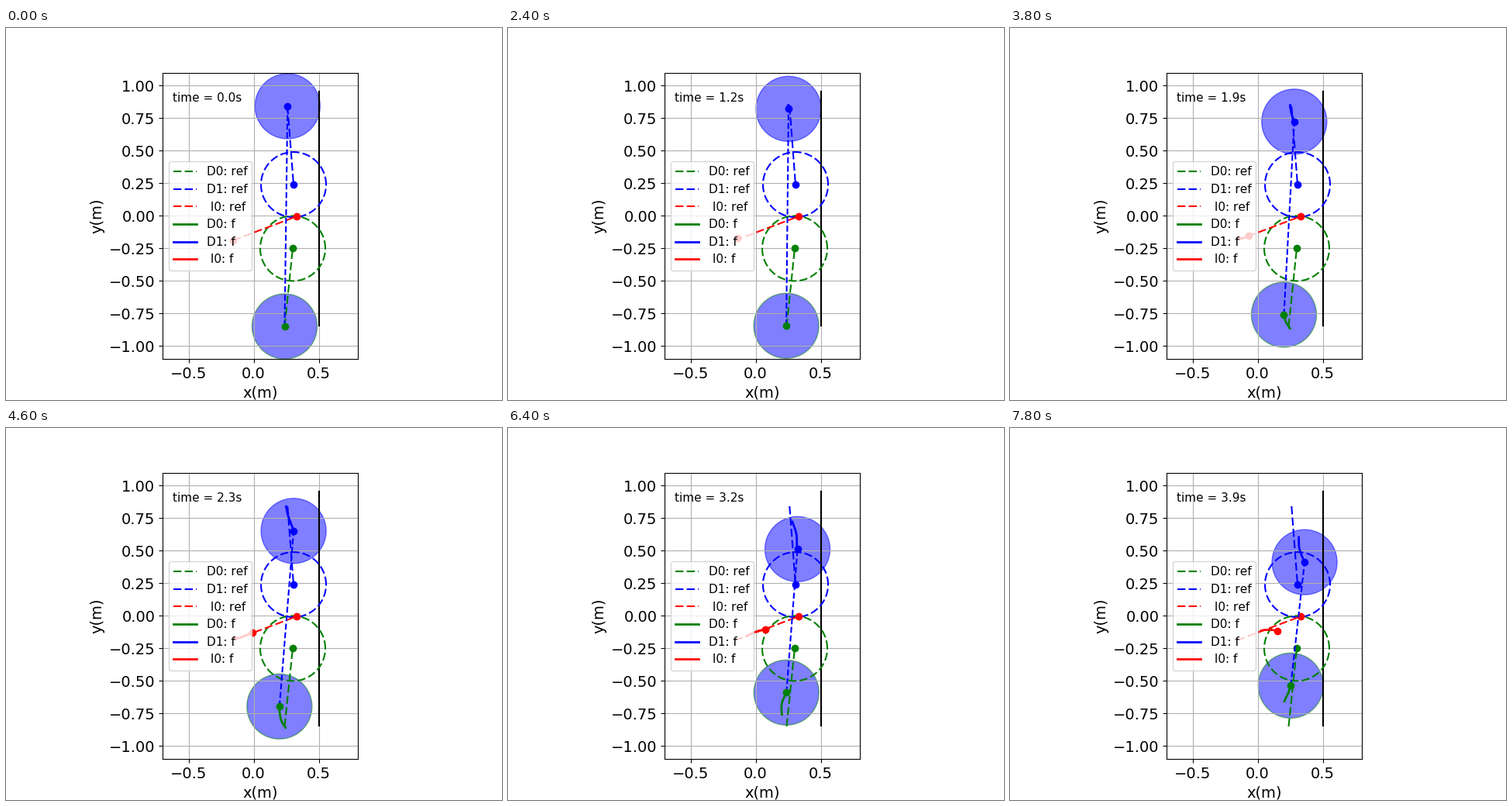
A matplotlib script that plays this animation: 640 by 480 pixels, repeating every 8000 ms.

```python
import numpy as np
import matplotlib.pyplot as plt
from matplotlib.animation import FuncAnimation
from matplotlib.patches import Circle

plt.rcParams["text.kerning_factor"] = 6

FRAMES, STEP_MS, DT = 40, 200, 0.1
TRAIL = 13  # steps kept in each solid trail
RADIUS = 0.25
DASH = (0, (5, 2))

# Each body passes its waypoints (metres) at these times (seconds)
STOPS = np.array([0, 1.0, 1.6, 2.4, 3.2, 4.0])
BODIES = [
    dict(name="D0", color="green", goal=(0.3, -0.25),
         way=[(0.2375, -0.849), (0.245, -0.859), (0.211, -0.801),
              (0.199, -0.682), (0.236, -0.589), (0.256, -0.528)]),
    dict(name="D1", color="blue", goal=(0.306, 0.24),
         way=[(0.26, 0.842), (0.249, 0.84), (0.264, 0.771),
              (0.311, 0.636), (0.321, 0.5125), (0.366, 0.398)]),
    dict(name=" I0", color="red", goal=(0.33, -0.004),
         way=[(-0.158, -0.188), (-0.153, -0.166), (-0.111, -0.17),
              (0.004, -0.121), (0.075, -0.107), (0.165, -0.115)]),
]


def glide(way, t):
    """Cubic Hermite curve through the waypoints."""
    p = np.array(way)
    m = np.gradient(p, STOPS, axis=0)
    i = np.searchsorted(STOPS, t, side="right") - 1
    h = (STOPS[i + 1] - STOPS[i])[:, None]
    u = (t - STOPS[i])[:, None] / h
    ease = u * u * (3 - 2 * u)
    bend = u * (1 - u) * ((1 - u) * m[i] - u * m[i + 1])
    return (p[i] + ease * (p[i + 1] - p[i]) + h * bend).T


times = np.arange(FRAMES) * DT
paths = [glide(b["way"], times) for b in BODIES]

fig, ax = plt.subplots(figsize=(6.4, 4.8), dpi=100)
ax.set_aspect("equal")
ax.set_xlim(-0.7, 0.8)
ax.set_ylim(-1.1, 1.1)
ax.set_xticks([-0.5, 0, 0.5])
ax.set_yticks(np.arange(-1, 1.1, 0.25))
ax.tick_params(labelsize=14)
ax.set_xlabel("x(m)", fontsize=14)
ax.set_ylabel("y(m)", fontsize=14)
ax.grid(True)

ax.plot([0.5, 0.5], [0.957, -0.84], color="black", lw=1.5)

angle = np.linspace(0, 2 * np.pi, 100)
for b in BODIES[:2]:
    gx, gy = b["goal"]
    ax.plot(gx + RADIUS * np.cos(angle), gy + RADIUS * np.sin(angle),
            color=b["color"], lw=1.5, ls=DASH)

for b in BODIES:
    ax.plot(*zip(b["way"][0], b["goal"]), color=b["color"], lw=1.5, ls=DASH,
            label=b["name"] + ": ref")
    ax.plot(*b["goal"], "o", color=b["color"])

trails = [ax.plot([], [], color=b["color"], lw=2, label=b["name"] + ": f")[0]
          for b in BODIES]
link, = ax.plot([], [], "--", color="blue", lw=1.5)
dots = [ax.plot([], [], "o", color=b["color"])[0] for b in BODIES]
discs = [ax.add_patch(Circle((0, 0), RADIUS, fc="blue", ec=b["color"], alpha=0.5))
         for b in BODIES[:2]]
clock = ax.text(0.05, 0.9, "", transform=ax.transAxes, fontsize=11)
ax.legend(loc="center left", fontsize=11)


def draw(n):
    for path, trail, dot in zip(paths, trails, dots):
        trail.set_data(*path[:, max(0, n - TRAIL):n + 1])
        dot.set_data(*path[:, n:n + 1])
    for path, disc in zip(paths, discs):
        disc.center = tuple(path[:, n])
    link.set_data(*zip(paths[0][:, n], paths[1][:, n]))
    clock.set_text(f"time = {times[n]:.1f}s")
    return [*trails, *dots, *discs, link, clock]


anim = FuncAnimation(fig, draw, frames=FRAMES, interval=STEP_MS,
                     repeat=True, repeat_delay=0, blit=False)
plt.show()
```
